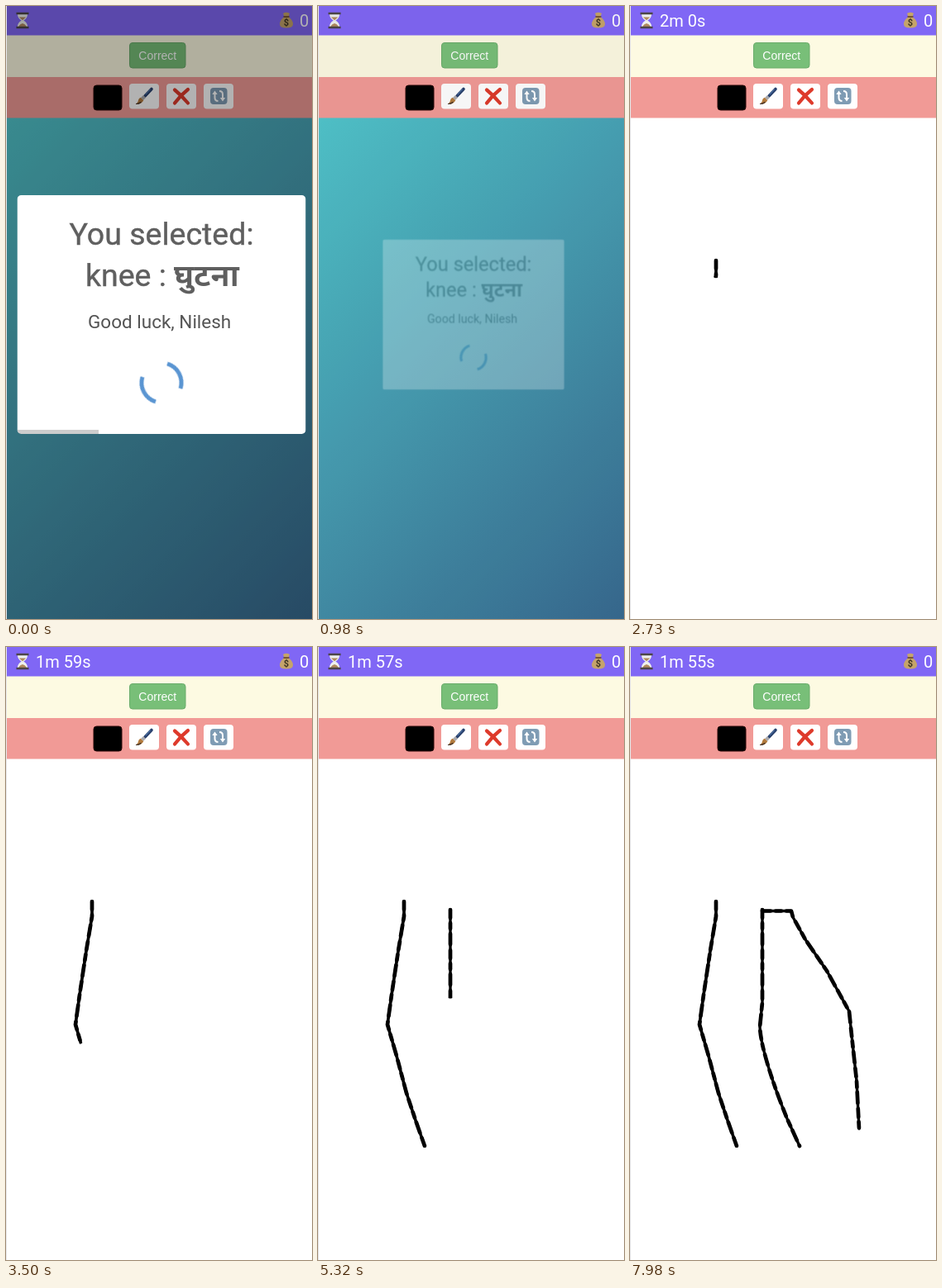
An HTML page that plays this animation: 370 by 742 pixels, repeating every 8000 ms.

```html
<!DOCTYPE html>
<html lang="en">
<head>
<meta charset="utf-8">
<title>Draw the word</title>
<style>
html, body { margin: 0; width: 100%; height: 100%; overflow: hidden; background: #fff; }
svg { display: block; }
.stage { width: 370px; height: 742px; }
text { font-family: Roboto, sans-serif; }
.head { font-size: 20px; fill: #fff; }
.title { font-size: 37.5px; fill: #5f5f5f; stroke: #5f5f5f; stroke-width: .4; }
.hindi { font-family: "Noto Sans", "Noto Sans Devanagari", FreeSans, sans-serif; font-weight: 700; stroke: none; }
.note { font-size: 22.5px; fill: #545454; }
.label { font: 14px "Liberation Sans", Arial, sans-serif; fill: #fff; }

/* One loop is 8 s; a 70 ms step is 0.875 %. */
.dim, .modal, .bar, .spin, .canvas, .ticks, .pen { animation: 8s linear infinite; }

.dim { animation-name: dim; }
@keyframes dim {
  0% { opacity: .3; animation-timing-function: step-end; }
  12.25% { opacity: .035; animation-timing-function: step-end; }
  13.125%, 100% { opacity: 0; }
}

.modal { animation-name: hide; transform-origin: 188px 373.5px; }
@keyframes hide {
  0% { transform: none; opacity: 1; animation-timing-function: step-end; }
  12.25% { transform: scale(.63); opacity: .26; animation-timing-function: step-end; }
  13.125%, 100% { transform: scale(.5); opacity: 0; }
}

.bar { animation-name: drain; transform-origin: 13.5px 0; }
@keyframes drain {
  0% { transform: scaleX(1); animation-timing-function: steps(12); }
  10.5% { transform: scaleX(.04); animation-timing-function: step-end; }
  11.375%, 100% { transform: scaleX(0); }
}

.spin { animation-name: spin; transform-origin: 188px 456px; }
@keyframes spin {
  0% { transform: rotate(-28deg); animation-timing-function: steps(15); }
  13.125%, 100% { transform: rotate(224deg); }
}

.canvas { animation-name: open; }
@keyframes open {
  0% { opacity: 0; animation-timing-function: step-end; }
  26.25%, 100% { opacity: 1; }
}

.ticks { animation: tick 8s step-end infinite; }
@keyframes tick {
  0% { transform: translateY(30px); }
  26.25% { transform: none; }
  38.5% { transform: translateY(-30px); }
  51.625% { transform: translateY(-60px); }
  63.875% { transform: translateY(-90px); }
  76.125% { transform: translateY(-120px); }
  89.25%, 100% { transform: translateY(-150px); }
}

/* Ink has uneven dashes; a mask along the same path reveals it. */
.ink { fill: none; stroke: #000; stroke-linejoin: round; stroke-linecap: round; }
.ink .fat { stroke-width: 4.7; stroke-dasharray: 10 6 7 6 13 7; }
.pen { fill: none; stroke: #fff; stroke-width: 9; stroke-linecap: round; stroke-dasharray: 100 300; stroke-dashoffset: 110; }
.first { animation-name: first; }
@keyframes first {
  0%, 32.375% { stroke-dashoffset: 110; animation-timing-function: steps(2); }
  34.125% { stroke-dashoffset: 94.5; animation-timing-function: steps(18); }
  49.875%, 50.75% { stroke-dashoffset: 12; animation-timing-function: steps(3); }
  53.375%, 100% { stroke-dashoffset: 0; }
}
.second { animation-name: second; }
@keyframes second {
  0%, 58.625% { stroke-dashoffset: 110; animation-timing-function: steps(22); }
  77.875%, 100% { stroke-dashoffset: 0; }
}
.third { animation-name: third; }
@keyframes third {
  0%, 80.5% { stroke-dashoffset: 110; animation-timing-function: steps(20); }
  98%, 100% { stroke-dashoffset: 0; }
}
</style>
</head>
<body>
<svg class="stage" viewBox="0 0 370 742">
  <defs>
    <linearGradient id="sea" gradientUnits="userSpaceOnUse" x1="-93" y1="93" x2="463" y2="649">
      <stop stop-color="#54d2d4"/>
      <stop offset=".5" stop-color="#479fb3"/>
      <stop offset="1" stop-color="#386a90"/>
    </linearGradient>
    <clipPath id="card"><rect x="13.5" y="229" width="349" height="289" rx="5"/></clipPath>
    <path id="left" pathLength="100" d="M104 308V326L97 368 89 421 84 457 95 495 107 540 118 573 129 604"/>
    <path id="middle" pathLength="100" d="M160 318V430L157 460Q158 475 163 493Q172 527 190 571L205 604"/>
    <path id="right" pathLength="100" d="M160 319.5H195L197 327 212 354 238 392 265 441 268 470 274 525 277 583"/>
    <g id="ink-left"><path d="M104 308V326L97 368 89 421 84 457 95 495 107 540 118 573 129 604"/></g>
    <g id="ink-middle"><path d="M160 318V430L157 460Q158 475 163 493Q172 527 190 571L205 604"/></g>
    <g id="ink-right"><path d="M160 319.5H195L197 327 212 354 238 392 265 441 268 470 274 525 277 583"/></g>
    <mask id="m1" maskUnits="userSpaceOnUse" x="0" y="0" width="370" height="742"><use href="#left" class="pen first"/></mask>
    <mask id="m2" maskUnits="userSpaceOnUse" x="0" y="0" width="370" height="742"><use href="#middle" class="pen second"/></mask>
    <mask id="m3" maskUnits="userSpaceOnUse" x="0" y="0" width="370" height="742"><use href="#right" class="pen third"/></mask>
  </defs>

  <!-- Page -->
  <rect width="370" height="742" fill="url(#sea)"/>
  <rect class="canvas" y="135" width="370" height="607" fill="#fff"/>
  <rect width="370" height="36" fill="#8067f5"/>
  <rect y="35.5" width="370" height="51" fill="#fdfae2"/>
  <rect y="86" width="370" height="49.5" fill="#f19a96"/>

  <!-- Hourglass -->
  <g>
    <path d="M14 10H26Q26 15 21.3 17.5Q26 20 26 25H14Q14 20 18.7 17.5Q14 15 14 10Z" fill="#eef0ee"/>
    <path d="M15.8 13.5H24.2L20 17.3ZM15 25Q17 21.5 20 21Q23 21.5 25 25Z" fill="#b08a5e"/>
    <path d="M12.5 9H27.5M12.5 26H27.5" stroke="#4c4648" stroke-width="2.4"/>
  </g>
  <!-- Money bag -->
  <g>
    <path d="M335 9Q339 6.500 343 9L341.500 13Q347 17 347 22Q347 26.500 339 26.500Q331 26.500 331 22Q331 17 336.500 13Z" fill="#c5a46a"/>
    <path d="M335.500 13H342.500" stroke="#6c4a2c" stroke-width="1.700"/>
    <text x="339" y="24.300" font-size="11" font-weight="700" text-anchor="middle" fill="#3d3423">$</text>
  </g>
  <text class="head" x="355" y="25">0</text>

  <svg x="36" y="5" width="90" height="28">
    <g class="ticks head">
      <text y="20">2m 0s</text>
      <text y="50">1m 59s</text>
      <text y="80">1m 58s</text>
      <text y="110">1m 57s</text>
      <text y="140">1m 56s</text>
      <text y="170">1m 55s</text>
    </g>
  </svg>

  <rect x="149.500" y="44.500" width="67.500" height="30.500" rx="3.500" fill="#78bf78" stroke="#6aac6b"/>
  <text class="label" x="183.300" y="64.800" text-anchor="middle">Correct</text>

  <!-- Tools -->
  <rect x="106" y="96" width="34" height="30" rx="3.500" fill="#000" stroke="#2a0808"/>
  <g fill="#fff">
    <rect x="149" y="94" width="36" height="30.500" rx="4"/>
    <rect x="194" y="94" width="36" height="30.500" rx="4"/>
    <rect x="239" y="94" width="36" height="30.500" rx="4"/>
  </g>
  <g stroke-linecap="round">
    <path d="M176 100.500L168 109" stroke="#273f6c" stroke-width="3.600"/>
    <path d="M174.500 101L169 107" stroke="#5c86bb" stroke-width="1"/>
    <path d="M167.500 109.500L164.500 112.500" stroke="#a9a9ad" stroke-width="4.200" stroke-linecap="butt"/>
    <path d="M162.800 110.800L166.300 114.300Q164 119 157.500 118.500Q160 116.500 160 114Q160.500 111.500 162.800 110.800Z" fill="#b27a3c"/>
    <path d="M157.500 118.500Q161 118.500 163 116.500" stroke="#423025" stroke-width="1.200" fill="none"/>
  </g>
  <path d="M204 101.500Q212 108 220 117.500M220 101Q211 108 204 117.500" fill="none" stroke="#de3a2b" stroke-width="4.200" stroke-linecap="round"/>
  <rect x="247" y="99" width="20.500" height="20" rx="4" fill="#7f9cb4"/>
  <g fill="none" stroke="#fff" stroke-width="2">
    <path d="M252.500 106V111Q252.500 115 256.500 115M262 112V107Q262 103 258 103"/>
    <path d="M249.300 107L252.500 102.500 255.700 107ZM258.800 111L262 115.500 265.200 111Z" fill="#fff" stroke="none"/>
  </g>

  <!-- Drawing -->
  <g class="ink">
    <g mask="url(#m1)"><use href="#ink-left" stroke-width="3.700"/><use href="#ink-left" class="fat"/></g>
    <g mask="url(#m2)"><use href="#ink-middle" stroke-width="3.400"/><use href="#ink-middle" class="fat"/></g>
    <g mask="url(#m3)"><use href="#ink-right" stroke-width="3.400"/><use href="#ink-right" class="fat"/></g>
  </g>

  <rect class="dim" width="370" height="742"/>

  <g class="modal">
    <g clip-path="url(#card)">
      <rect x="13" y="229" width="350" height="289" fill="#fff"/>
      <rect class="bar" x="13.500" y="513" width="98.500" height="5" fill="#ccc"/>
    </g>
    <text class="title" x="188" y="289" text-anchor="middle">You selected:</text>
    <text class="title" x="96" y="339">knee :</text>
    <text class="title hindi" x="203" y="339">घुटना</text>
    <text class="note" x="99" y="389.500">Good luck, Nilesh</text>
    <g class="spin" fill="none" stroke="#5a95d2" stroke-width="5">
      <path d="M205 439A24 24 0 0 1 205 473M171 473A24 24 0 0 1 171 439"/>
    </g>
  </g>

  <rect width="1" height="742" fill="#e6e6e8"/>
</svg>
</body>
</html>
```
